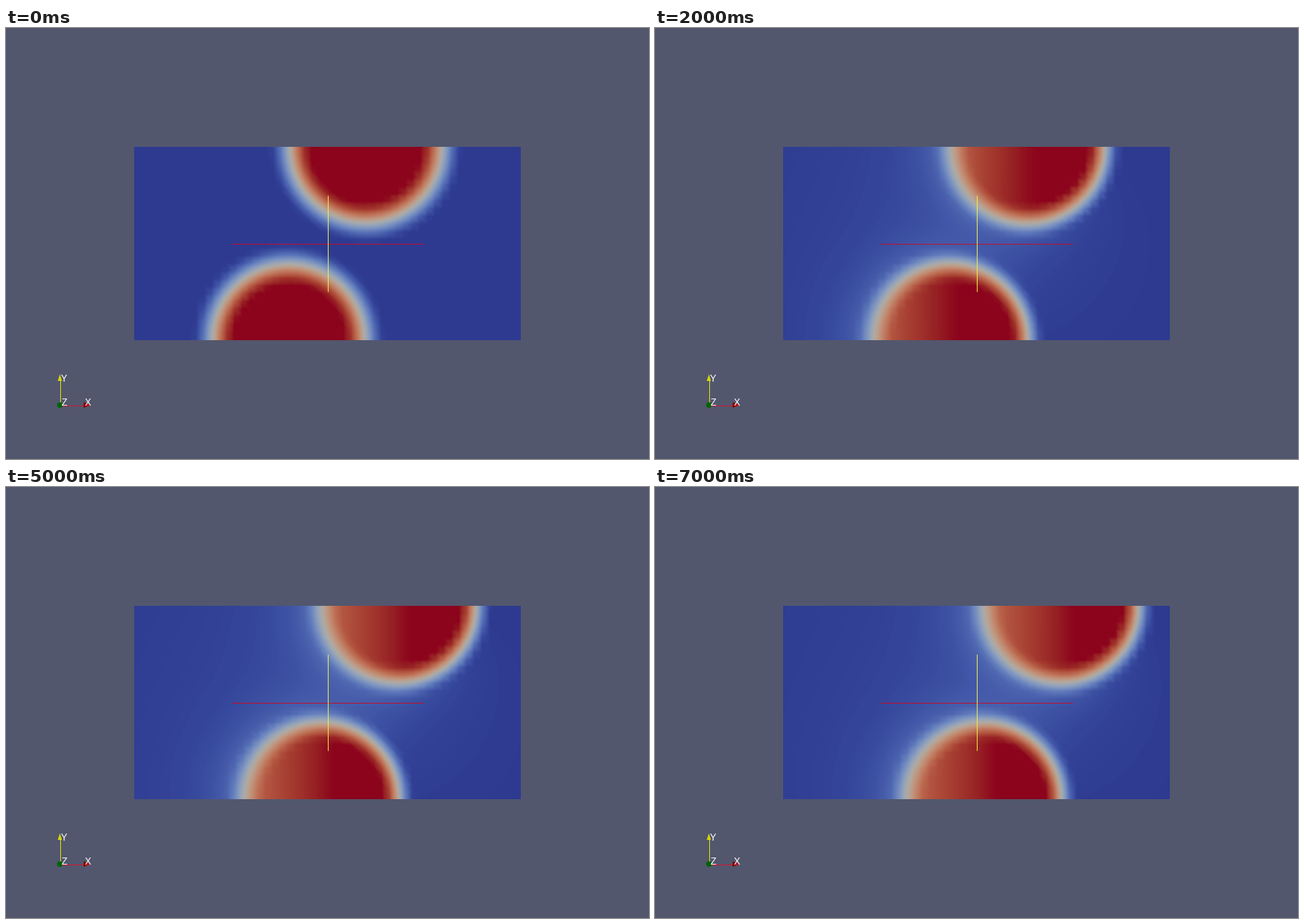
These frames come from a looping animation (913 px wide and 613 px high, 8 s). A matplotlib script:

```python
import numpy as np
import matplotlib.pyplot as plt
from matplotlib.animation import FuncAnimation
from matplotlib.patches import Circle, Polygon

W, H, DPI = 913, 613, 64
FRAMES, INTERVAL = 8, 1000
X0, X1, Y0, Y1 = 182, 731, 169, 444      # simulated domain in pixels
NX, NY = 50, 25                          # mesh cells
SPEED = 9.5                              # drift per step in pixels
LIGHT = np.array([0.78, 0.77, 0.75])     # shading of the colour map
PX = 72 / DPI

cmap = plt.get_cmap("coolwarm")
node_x, node_y = np.meshgrid(np.linspace(X0, X1, NX + 1),
                             np.linspace(Y0, Y1, NY + 1))

# position of every pixel centre inside its mesh cell
u = (np.arange(X1 - X0) + 0.5) * NX / (X1 - X0)
v = (np.arange(Y1 - Y0) + 0.5) * NY / (Y1 - Y0)
col, row = np.meshgrid(u.astype(int), v.astype(int))
fx, fy = np.meshgrid(u % 1, v % 1)


def smoothstep(a):
    a = np.clip(a, 0, 1)
    return a * a * (3 - 2 * a)


def drop_field(cx, cy, step):
    """Concentration of one drifting drop, with a wake on its left."""
    age = 1 - np.exp(-1.1 * step)
    dx, dy = node_x - cx, (node_y - cy) * (1 + 0.02 * age)
    r = np.hypot(dx, dy)
    left = 0.5 * (1 - dx / np.maximum(r, 1e-6))

    radius = 108 + age
    half = 29 - age * (7 - 5 * left)
    core = smoothstep((radius + half - r) / (2 * half))

    out = np.maximum(r - radius, 0)
    wake = age * left * (0.27 * np.exp(-out / 27) + 0.08 * np.exp(-out / 110))
    behind = np.maximum(19 - dx, 0) / 100
    loss = 0.16 * age * behind ** (1 + 1 / max(step, 1))
    return (1 - (1 - core) * (1 - wake)) * (1 - np.minimum(loss, 0.3))


def interpolate(f):
    """Linear interpolation on triangles split from top left to bottom right."""
    tl, tr = f[row, col], f[row, col + 1]
    bl, br = f[row + 1, col], f[row + 1, col + 1]
    upper = tl + fx * (tr - tl) + fy * (br - tr)
    lower = tl + fy * (bl - tl) + fx * (br - bl)
    return np.where(fx >= fy, upper, lower)


def render(step):
    shift = SPEED * step
    top = drop_field(511 + shift, Y0, step)
    bottom = drop_field(401.5 + shift, Y1, step)
    field = 1 - (1 - top) * (1 - bottom)
    return cmap(interpolate(field))[..., :3] * LIGHT


fig = plt.figure(figsize=(W / DPI, H / DPI), dpi=DPI, facecolor="#52576e")
ax = fig.add_axes([0, 0, 1, 1])
ax.axis("off")
image = ax.imshow(render(0), extent=(X0, X1, Y1, Y0),
                  interpolation="nearest", aspect="auto", zorder=1)
ax.set_xlim(0, W)
ax.set_ylim(H, 0)


def line(xs, ys, color):
    ax.plot(xs, ys, color=color, lw=PX, solid_capstyle="butt", zorder=2)


def label(x, y, text):
    ax.text(x, y, text, color="white", family="Liberation Sans",
            fontsize=13.5 * PX, ha="center", va="baseline", zorder=5)


# centre cross
line([320, 593], [306.5, 306.5], "#c40d2c")
line([456.5, 456.5], [238, 375], "#f0f04a")

# orientation axes
line([76.5, 76.5], [536, 500], "#e6e600")
line([77, 112], [536.5, 536.5], "#d8142c")
ax.add_patch(Polygon([(73.5, 502), (79.5, 502), (76.5, 492.5)],
                     fc="#d8d800", lw=0, zorder=3))
ax.add_patch(Polygon([(110.5, 532.5), (110.5, 540), (120, 536.5)],
                     fc="#c80000", lw=0, zorder=3))
ax.add_patch(Polygon([(110.5, 532.5), (110.5, 540), (113.5, 538.5), (113.5, 534)],
                     fc="#6e0000", lw=0, zorder=4))
ax.add_patch(Circle((76.5, 536.3), 4, fc="#006400", lw=0, zorder=4))
label(82.3, 503, "Y")
label(83, 537, "Z")
label(116.5, 537, "X")


def update(i):
    image.set_data(render(i))
    return [image]


anim = FuncAnimation(fig, update, frames=FRAMES, interval=INTERVAL,
                     repeat=True, repeat_delay=0, blit=False)
plt.show()
```
